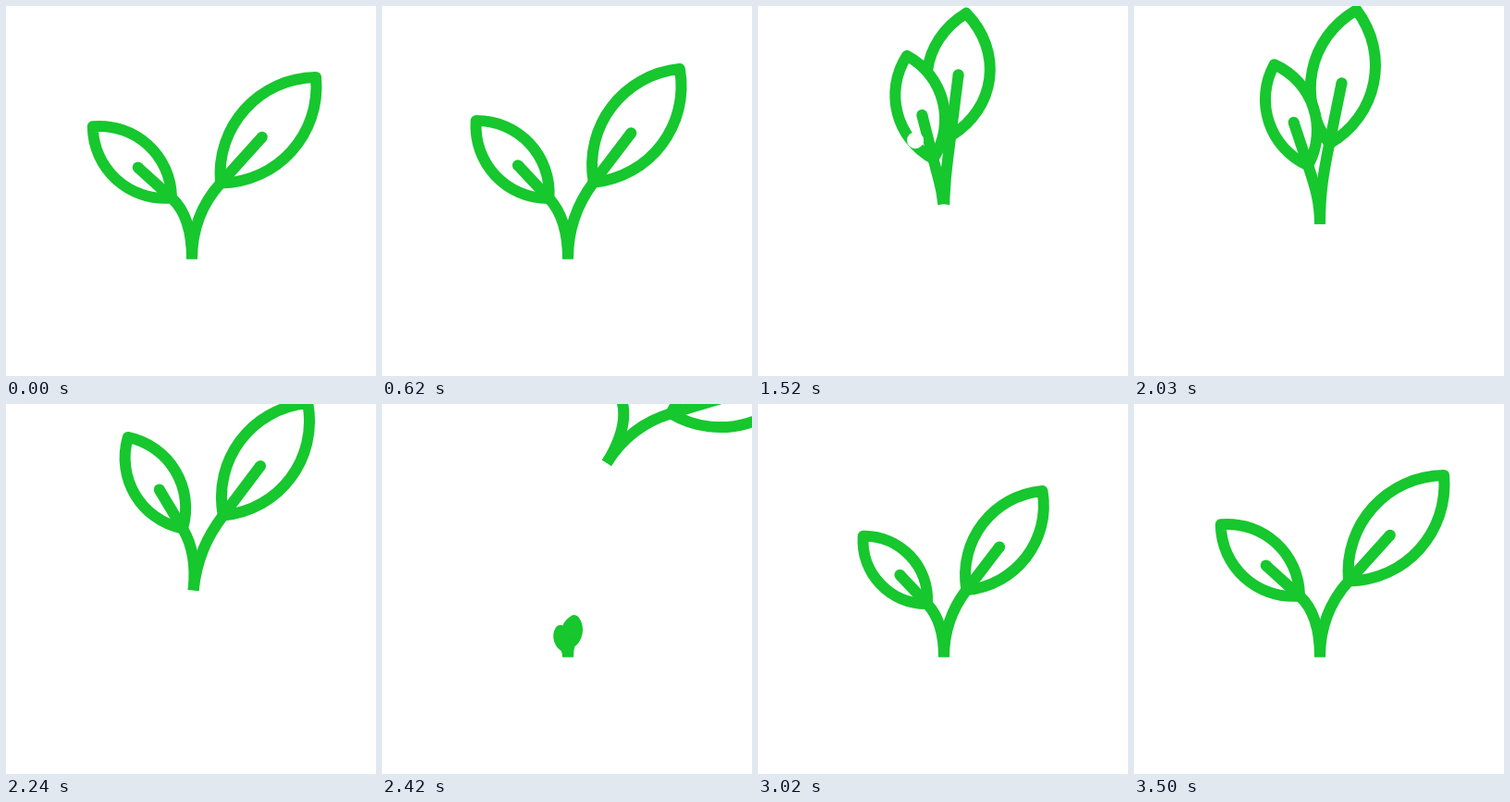
An HTML page with a canvas that plays this animation: 400x400 px, repeating every 3530 ms.

```html
<!DOCTYPE html>
<html lang="en">
<head>
<meta charset="utf-8">
<title>Sprout</title>
<style>
html, body { margin: 0; width: 100%; height: 100%; overflow: hidden; background: #fff; }
canvas { display: block; }
</style>
</head>
<body>
<canvas id="stage" width="400" height="400"></canvas>
<script>
const ctx = document.getElementById('stage').getContext('2d');
const LOOP = 3530, STEP = 30, GREEN = '#16c72e', RAD = Math.PI / 180;
const GROUND = { x: 201, y: 273.5 };

// Tracks are lists of [time, value].
const FOLD = [[500, 0], [970, 1], [1040, 1], [1270, 0.85], [1540, 0.95], [1880, 0.95], [2480, 0]];
const HEIGHT = [[960, GROUND.y], [1300, 227], [2120, 236]];
const SQUEEZE = [[960, 1], [1300, 0.86], [2500, 1]];

// Paired values are open and folded.
const LEAVES = [
  { x: [31, 6], y: [-82, -88], angle: [42, 5.3], length: 154, vein: 67, bend: 30 },
  { x: [-22, -11], y: [-66, -63], angle: [-47.8, -12.5], length: 115, vein: 49, bend: 22 }
];

const mix = (a, b, p) => a + (b - a) * p;
const clamp = p => Math.min(1, Math.max(0, p));
const easeInOut = p => p < 0.5 ? 2 * p * p : 1 - 2 * (1 - p) ** 2;

function track(keys, t) {
  if (t <= keys[0][0]) return keys[0][1];
  for (let i = 1; i < keys.length; i++) {
    const [t0, a] = keys[i - 1], [t1, b] = keys[i];
    if (t < t1) return mix(a, b, easeInOut((t - t0) / (t1 - t0)));
  }
  return keys[keys.length - 1][1];
}

// Builds a path under a transform, then paints with an unscaled line.
function shape(place, build, fill) {
  ctx.save();
  place();
  ctx.beginPath();
  build();
  ctx.restore();
  if (fill) {
    ctx.fillStyle = fill;
    ctx.fill();
  }
  ctx.stroke();
}

function dot(x, y, r, color) {
  ctx.fillStyle = color;
  ctx.beginPath();
  ctx.arc(x, y, r, 0, 2 * Math.PI);
  ctx.fill();
}

function leafPath(length, squeeze) {
  const w = length * 0.293, end = length * squeeze, near = end * 0.27, far = end - near;
  ctx.moveTo(0, 0);
  ctx.bezierCurveTo(-w, -near, -w, -far, 0, -end);
  ctx.bezierCurveTo(w, -far, w, -near, 0, 0);
  ctx.closePath();
}

// The taller leaf shortens under the top edge by the squeeze factor.
function sprout({ x, y, fold, scale = 1, squeeze = 1, turn = 0 }) {
  const place = () => {
    ctx.translate(x, y);
    ctx.rotate(turn);
    ctx.scale(scale, scale);
  };
  const parts = LEAVES.map((l, i) => ({
    ...l,
    x: mix(...l.x, fold),
    y: mix(...l.y, fold),
    angle: mix(...l.angle, fold) * RAD,
    squeeze: i ? 1 : squeeze
  }));

  for (const p of parts) {
    shape(() => {
      place();
      ctx.translate(p.x, p.y);
      ctx.rotate(p.angle);
    }, () => leafPath(p.length, p.squeeze), '#fff');
  }

  for (const p of parts) {
    const dx = Math.sin(p.angle), dy = -Math.cos(p.angle);
    const end = [p.x + dx * p.vein, p.y + dy * p.vein];
    shape(place, () => {
      ctx.moveTo(0, 0);
      ctx.bezierCurveTo(0, p.y * 0.4, p.x - dx * p.bend, p.y - dy * p.bend, p.x, p.y);
      ctx.lineTo(...end);
    });
    ctx.save();
    place();
    const tip = ctx.getTransform().transformPoint({ x: end[0], y: end[1] });
    ctx.restore();
    dot(tip.x, tip.y, 6, GREEN);
  }
}

// White puff at the foot of the stem and a speck thrown up from it.
function puff(p) {
  if (p <= 0 || p >= 1) return;
  const out = 1 - (1 - p) ** 2;
  dot(201, 236, 22 * Math.sin(Math.PI * p), '#fff');
  dot(201 - 44 * out, 273 - 182 * out, 9 * Math.min(1, 2.2 * (1 - p)), '#fff');
}

function draw(t) {
  ctx.fillStyle = '#fff';
  ctx.fillRect(0, 0, 400, 400);
  ctx.strokeStyle = GREEN;
  ctx.lineWidth = 12;
  ctx.lineJoin = 'round';

  if (t < 2660) {
    const turn = 32 * RAD * Math.max(0, (t - 2100) / 320) ** 2;
    sprout({
      x: GROUND.x + 276 * (1 - Math.cos(turn)),
      y: track(HEIGHT, t) - 325 * Math.sin(turn),
      fold: track(FOLD, t),
      squeeze: track(SQUEEZE, t),
      turn
    });
  }

  const grown = 1 - (1 - clamp((t - 2334) / 1181)) ** 2.4;
  if (grown > 0) sprout({ ...GROUND, fold: 1 - grown, scale: grown });

  puff((t - 1420) / 220);
}

function frame(now) {
  const t = now % LOOP;
  draw(t < 530 ? 0 : 20 + STEP * Math.floor((t - 20) / STEP));
  requestAnimationFrame(frame);
}

draw(0);
requestAnimationFrame(frame);
</script>
</body>
</html>
```
